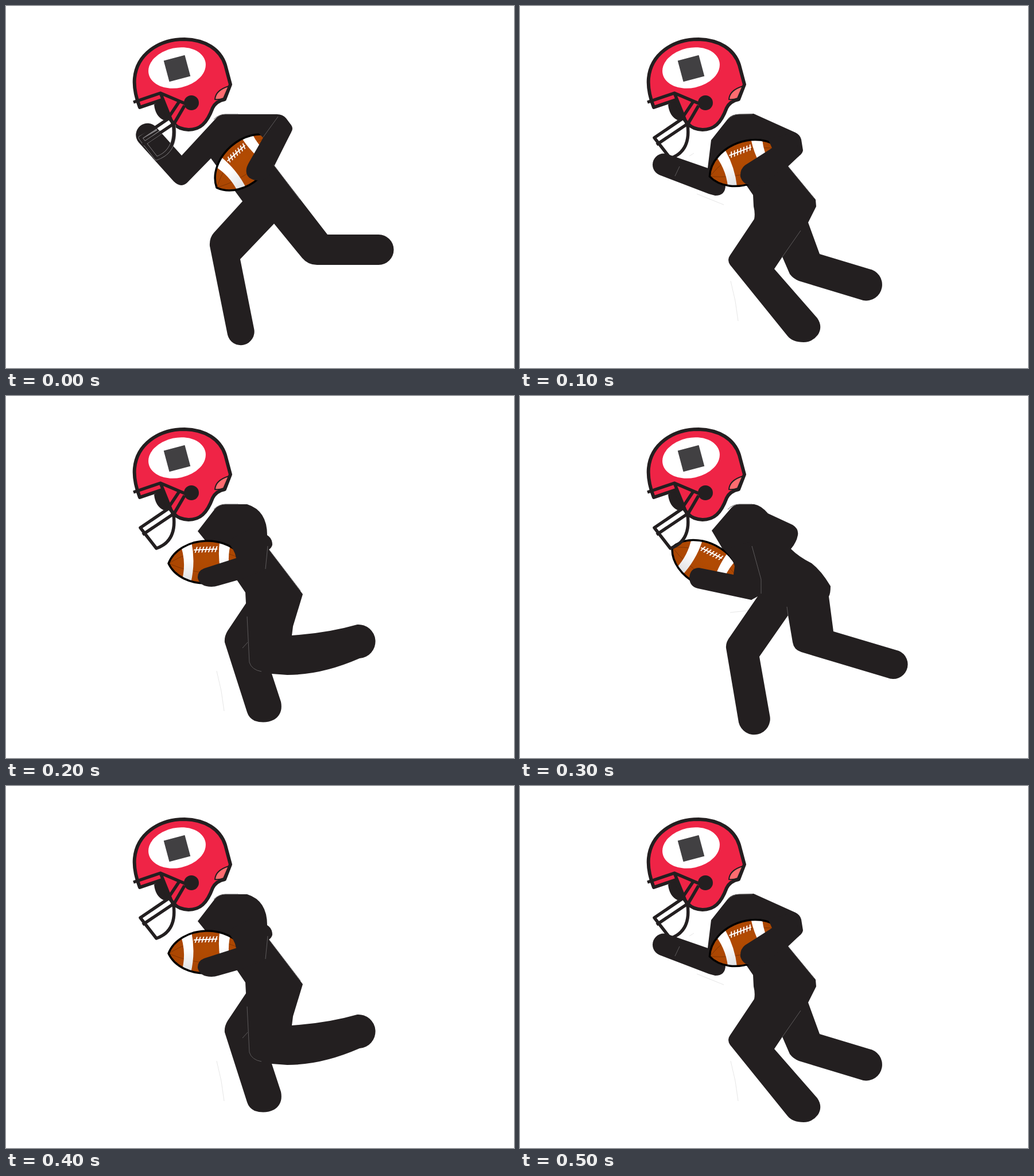
Animation, 885 px wide and 632 px high, one loop 0.6 s. Source, as an HTML page:

```html
<!DOCTYPE html>
<html lang="en">
<head>
<meta charset="utf-8">
<title>Running football player</title>
<style>
  html, body { margin: 0; width: 100%; height: 100%; overflow: hidden; background: #fff; }
  svg { display: block; width: 100%; height: 100%; }
  .line { fill: none; stroke: #231f20; stroke-width: 5.5; stroke-linejoin: round; }
  .seam { fill: none; stroke: #5d5a5b; stroke-width: 1; }
  .trace { fill: none; stroke: #e6e6e6; stroke-width: 1; }
</style>
</head>
<body>
<svg viewBox="0 0 885 632" fill="#231f20">
  <defs>
    <radialGradient id="leather" cx=".5" cy=".4" r=".6">
      <stop offset="0" stop-color="#b24b02"/>
      <stop offset="1" stop-color="#a94502"/>
    </radialGradient>
    <linearGradient id="stripe" x2="0" y2="1">
      <stop offset=".4" stop-color="#fff"/>
      <stop offset="1" stop-color="#dcdcde"/>
    </linearGradient>
    <path id="skin" d="M-66 0C-56-24-28-37 0-37S56-24 66 0C56 24 28 37 0 37S-56 24-66 0Z"/>
    <clipPath id="inside"><use href="#skin"/></clipPath>
    <path id="band" d="M-46-38Q-32 0-46 38H-29Q-18 0-25-38Z" fill="url(#stripe)"/>
    <g id="ball">
      <use href="#skin" fill="url(#leather)"/>
      <g clip-path="url(#inside)">
        <path d="M-66 0Q-30-20 0-21T66 0M-66 0Q-30 17 0 18T66 0" fill="none" stroke="#7d3303" stroke-width=".8"/>
        <use href="#band"/>
        <use href="#band" transform="scale(-1 1)"/>
      </g>
      <path d="M-21-22H20" stroke="#fff" stroke-width="2"/>
      <path d="M-18-22H19" stroke="#fff" stroke-width="10" stroke-dasharray="2 3.800" transform="translate(-8) skewX(-20)"/>
      <use href="#skin" fill="none" stroke="#000" stroke-width="3.500" stroke-linejoin="round"/>
    </g>
  </defs>

  <g id="runner"></g>

  <g id="helmet">
    <path d="M258 172Q260 192 274 199L285 198L271 164Z"/>
    <path class="line" style="fill:#ef2446;stroke-width:6" d="M233 177Q222 148 224 126C228 85 265 58 311 58C347 59 373 75 382 103L391 137L381 163Q366 166 360 178C350 205 338 216 318 216Q301 215 293 206L281 192L271 164Z"/>
    <path d="M364 163Q365 147 388 140L379 161Q371 164 364 163Z" fill="#ff6c70" stroke="#231f20" stroke-width="2"/>
    <ellipse cx="298" cy="108" rx="50.500" ry="35" fill="#fff" transform="rotate(-12 298 108)"/>
    <rect x="279" y="90" width="38" height="38" fill="#414042" transform="rotate(-15 298 109)"/>
    <path id="halo" class="line" style="stroke:#858385;stroke-width:7" d="M262 214L234 230L262 266C285 258 296 240 292 208M238 242L270 220"/>
    <path class="line" d="M222 168L269 152L316 172M269 152L291 207M301 168L281 198L234 230L262 266C285 258 296 240 292 208M311 174L293 205L238 242"/>
    <circle cx="323" cy="169" r="13"/>
  </g>
</svg>
<script>
// Each pose: body, ball placement (x, y, angle), the arm over the ball, seams and faint traces.
const poses = [
  {
    body: "M262 212L306 261L365 197Q372 189 382 189H472Q482 189 488 196L497 208Q501 214 497 220L466 277L560 399H649A26.500 26.500 0 0 1 649 452H542Q526 452 516 440L467 380L408 442L432 563A23.500 23.500 0 0 1 386 574L355 419Q354 405 362 396L412 341L357 266L318 306Q306 320 292 306L231 238A20 20 0 0 1 262 212Z",
    ball: [416, 273, -42],
    arm: "M440 222L448 230L424 272Q413 290 424 300Q440 310 458 298L497 220L480 195Z",
    seams: "M448 229L474 193M466 277L512 338",
    traces: ""
  },
  {
    body: "M258 259L327 283L333 234L363 196Q370 189 380 189L407 188L480 221Q488 225 490 233L493 252Q492 258 486 262L467 280L515 338L516 350L502 378L522 433L608 459A27.500 27.500 0 0 1 598 514L486 480Q476 476 470 468L457 438L443 459L518 545Q528 560 519 574Q509 587 494 587Q475 587 466 576L366 452Q360 443 366 435L408 372Q410 362 407 350L406 330L395 314L358 313Q358 331 340 331L329 328L243 295A19.500 19.500 0 0 1 258 259Z",
    ball: [392, 274, -21],
    arm: "M432 232L439 248L392 278Q383 285 384 298Q388 312 405 314Q415 315 422 312L486 262L480 221Z",
    seams: "M489 392L457 438M467 280L512 335M278 280L270 297",
    traces: "M295 262L303 257M308 328L355 347M367 480L375 515L380 550"
  },
  {
    body: "M334 236L364 197Q372 189 382 189H420Q455 200 455 243Q464 248 464 260Q462 266 458 268L517 346L500 402L498 418Q560 414 612 399A29.500 29.500 0 0 1 616 458Q550 487 490 487L463 485L479 534Q483 555 467 565Q451 573 433 567Q423 562 420 552L381 430Q380 420 386 410L418 362L417 343L398 315Z",
    ball: [349, 290, -2],
    arm: "M384 254Q398 266 401 283L345 301Q333 306 334 318Q338 333 358 333Q364 333 370 331L412 319L455 302V262L430 230Z",
    seams: "M420 385L424 465Q428 478 445 481M452 302L456 262M458 268L513 340M412 440L421 430",
    traces: "M367 480L375 515L380 550"
  },
  {
    body: "M334 235L364 200Q372 189 382 189H408Q420 191 432 205L475 225Q486 232 484 243Q482 255 472 267Q486 281 508 292Q525 305 541 332Q541 345 538 350L546 411L660 445A24.500 24.500 0 0 1 640 492L490 447Q477 443 475 430L467 383L417 455L435 557A27 27 0 0 1 381 570L359 440Q358 430 366 420L414 350L403 356L350 262Z",
    ball: [324, 294, 27],
    arm: "M355 268Q370 282 374 297L372 312L312 300Q296 300 295 318Q296 333 310 336L403 356L414 345L422 320L400 255Z",
    seams: "M404 262L420 320V345M465 368L467 383",
    traces: "M366 378L412 373"
  }
];
const order = [0, 1, 2, 3, 2, 1];
const shoulder = "M362 198Q371 189 382 189H405";

const runner = document.getElementById("runner");
const halo = document.getElementById("halo");

runner.innerHTML = poses.map(({ body, ball: [x, y, angle], arm, seams, traces }) => `<g>
  <path class="trace" d="${traces}"/>
  <path d="${body}"/>
  <use href="#ball" transform="translate(${x} ${y}) rotate(${angle})"/>
  <path d="${arm}"/>
  <path class="seam" d="${shoulder}${seams}"/>
</g>`).join("");

function draw() {
  const pose = order[Math.floor(performance.now() / 100) % order.length];
  [...runner.children].forEach((g, i) => g.style.display = i === pose ? "" : "none");
  // The mask needs a light rim only where it crosses the raised fist.
  halo.style.display = pose === 0 ? "" : "none";
  requestAnimationFrame(draw);
}
draw();
</script>
</body>
</html>
```
